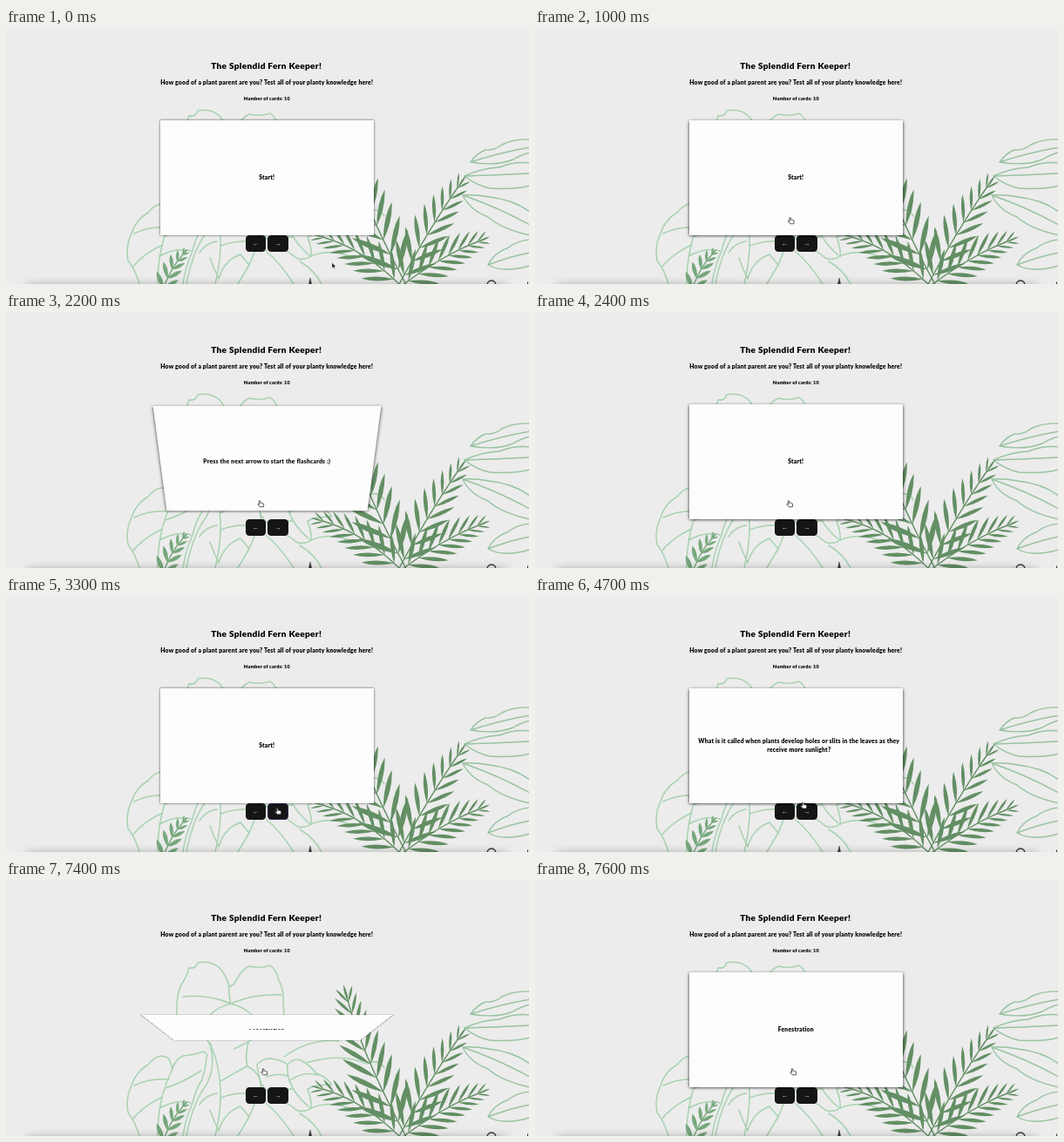
An HTML page for the animation above (8000 ms loop, 600 by 294 pixels).

```html
<!DOCTYPE html>
<html lang="en">
<head>
<meta charset="utf-8">
<title>Plant flashcards</title>
<style>
  html, body { margin: 0; width: 100%; height: 100%; overflow: hidden; background: #ececec; }
  #stage { position: relative; width: 600px; height: 294px; overflow: hidden; font: 900 6.8px Lato, sans-serif; color: #000; }
  text, #label { letter-spacing: .029em; }
  svg { position: absolute; left: 0; top: 0; overflow: visible; }
  .fade { position: absolute; left: 26px; top: 298px; width: 548px; height: 10px; box-shadow: 0 0 12px 1px rgba(0,0,0,.45); }
  #card {
    position: absolute; left: 177px; top: 106px; width: 244.5px; height: 131.5px;
    box-sizing: border-box; background: #fdfdfd; outline: 1px solid transparent;
    display: flex; align-items: center; justify-content: center;
    text-align: center; line-height: 9.8px; white-space: pre;
    box-shadow: 0 0 2.5px rgba(0,0,0,.7);
  }
  #card.hover { box-shadow: 0 .5px 3.5px rgba(0,0,0,.9); }
  #label { display: inline-block; }
  .btn {
    position: absolute; top: 238px; width: 23.5px; height: 19px; box-sizing: border-box;
    border: 1px solid #151515; border-radius: 4px; background: #151515; color: #e6e6e6;
    font: 400 7.5px/17px "Liberation Sans", sans-serif; text-align: center;
  }
  .btn.hover { border-color: #2b2a5c; }
</style>
</head>
<body>
<div id="stage">
  <svg width="600" height="294" viewBox="0 0 600 294">
    <g fill="none" stroke="#a8d2b0" stroke-width="1.5" stroke-linecap="round" stroke-linejoin="round">
      <!-- top leaf -->
      <path d="M196 155Q195 136 200 122Q207 112 210 101Q218 102 220 95Q236 92 246 102Q253 111 256 122Q260 122 263 117Q270 103 279 99Q292 102 303 98Q311 104 312 113Q319 125 318 139L319 156"/>
      <path d="M256 122Q255 132 258 142Q232 131 203 134M258 142Q242 146 233 156M258 142Q285 130 316 132M258 142Q274 146 284 157M196 155Q220 170 236 190M319 156Q296 178 262 194"/>
      <!-- lower left leaf -->
      <path d="M153 294Q149 279 140 267Q137 251 144 236Q149 220 163 212Q170 203 178 202Q187 203 188 208L191 217Q194 206 203 202Q216 201 226 197Q232 198 230 205Q229 217 225 229Q217 242 214 256Q206 274 203 294"/>
      <path d="M191 217Q174 250 174 294M187 229Q166 227 147 236M180 249Q158 259 146 274M183 239Q204 232 224 219M176 262Q197 251 212 256"/>
      <!-- lower middle leaf -->
      <path d="M233 187Q242 212 230 235Q214 256 207 294M278 186Q274 204 277 214Q293 222 292 238Q286 256 279 272L266 294"/>
      <path d="M236 192Q254 236 240 294M246 231Q262 222 276 214M247 250Q266 242 290 246M234 264Q238 276 244 288Q250 267 269 260L279 272M242 245Q229 247 222 258"/>
      <!-- right middle leaf -->
      <path d="M288 212Q294 205 303 205Q315 206 323 212Q330 204 338 207Q348 212 356 222Q367 226 374 235Q355 235 346 240Q351 253 350 262Q341 268 333 264Q324 256 313 252Q301 247 293 234Q289 223 288 212"/>
      <path d="M323 212Q320 237 348 261M323 225Q311 221 299 226M330 240Q315 239 306 247M326 230Q341 219 358 224M298 256Q315 270 330 294M350 262Q371 253 397 263M337 268Q354 278 362 294M319 203Q349 181 382 185M344 210Q385 198 413 211Q429 205 434 216"/>
    </g>
    <g fill="none" stroke="#98c3a0" stroke-width="1.4" stroke-linecap="round" stroke-linejoin="round">
      <path d="M533 154Q540 144 550 140Q560 141 569 134Q583 127 601 128M533 154Q562 159 582 151Q592 145 601 143M533 154Q566 143 601 137"/>
      <path d="M526 170Q545 161 566 160Q584 153 601 155M526 170Q540 181 555 184Q583 186 601 181M526 170Q563 169 601 167"/>
      <path d="M524 192Q538 191 554 194Q582 197 601 211M524 192Q532 209 553 217Q569 231 601 238M524 192Q562 205 601 226"/>
      <path d="M553 272Q560 258 575 253Q587 244 601 243M553 272Q570 282 601 273M553 272Q579 262 601 258"/>
    </g>
    <g id="fronds"></g>
    <g fill="none" stroke="#333">
      <path d="M349 287L347.5 294H350.5Z" fill="#333" stroke-width=".5"/>
      <circle cx="557" cy="295" r="5" stroke-width="1.3"/>
      <path d="M598.5 294V291.5" stroke-width="1"/>
    </g>
    <g text-anchor="middle">
      <text x="298.7" y="46.8" font-size="10.1">The Splendid Fern Keeper!</text>
      <text x="299.2" y="64.8">How good of a plant parent are you? Test all of your planty knowledge here!</text>
      <text x="299.3" y="83.2" font-size="5.5">Number of cards: 10</text>
    </g>
  </svg>
  <div class="fade"></div>
  <div class="btn" style="left:274.8px">←</div>
  <div class="btn" id="next" style="left:300px">→</div>
  <div id="card"><span id="label"></span></div>
  <svg width="600" height="294" viewBox="0 0 600 294">
    <g id="cursor" stroke-linejoin="round">
      <path id="arrow" d="M0 0V6.2L1.5 4.9L2.5 7L3.5 6.5L2.5 4.5H4.4Z" fill="#111" stroke="#fff" stroke-width=".4"/>
      <path id="hand" d="M-.8 .6Q0 -.5 .7 .6L1.1 2.7Q2 2.1 2.5 3Q3.5 2.5 3.8 3.5Q4.9 3.4 4.7 4.6L4.3 7.3H.2L-2.3 4.4Q-2 3.4 -.9 3.9L-.1 4.5Z" fill="#fff" stroke="#222" stroke-width=".75"/>
    </g>
  </svg>
</div>
<script>
const $ = id => document.getElementById(id);
const card = $('card'), label = $('label'), next = $('next');
const LOOP = 8000, STEP = 100, FLIP = 200;

// Stem along a quadratic curve, with pairs of leaflets that shorten towards the tip.
function frond([x0, y0], [cx, cy], [x1, y1], { pairs, size, fat = .13, spread = .75, fill = '#638f64' }) {
  let d = '';
  const leaf = (x, y, a, len) => {
    const c = Math.cos(a), s = Math.sin(a), w = len * fat;
    const at = (u, v) => (x + u * c - v * s).toFixed(1) + ' ' + (y + u * s + v * c).toFixed(1);
    d += `M${at(0, 0)}Q${at(len * .5, w)} ${at(len, 0)}Q${at(len * .6, -w)} ${at(0, 0)}Z`;
  };
  for (let i = 0; i < pairs; i++) {
    const k = .12 + .86 * i / (pairs - 1), m = 1 - k;
    const x = m * m * x0 + 2 * m * k * cx + k * k * x1;
    const y = m * m * y0 + 2 * m * k * cy + k * k * y1;
    const a = Math.atan2(m * (cy - y0) + k * (y1 - cy), m * (cx - x0) + k * (x1 - cx));
    const len = size * (1 - .6 * k * k), turn = spread * (1 - .35 * k);
    leaf(x, y, a - turn, len);
    leaf(x, y, a + turn, len * .95);
    if (i === pairs - 1) leaf(x, y, a, len);
  }
  $('fronds').insertAdjacentHTML('beforeend',
    `<path d="${d}" fill="${fill}"/>
     <path d="M${x0} ${y0}Q${cx} ${cy} ${x1} ${y1}" fill="none" stroke="${fill}" stroke-width="1.4"/>`);
}
frond([462, 300], [410, 205], [392, 138], { pairs: 10, size: 50 });
frond([448, 300], [484, 232], [519, 182], { pairs: 8, size: 42 });
frond([450, 299], [498, 262], [542, 245], { pairs: 8, size: 38 });
frond([456, 299], [412, 254], [363, 240], { pairs: 8, size: 38 });
frond([178, 306], [188, 276], [203, 260], { pairs: 5, size: 21, fat: .25, fill: '#77a87c' });

function bezier(p, ax, ay, bx, by) {
  if (p <= 0 || p >= 1) return p <= 0 ? 0 : 1;
  const f = (u, a, b) => 3 * u * (1 - u) * (1 - u) * a + 3 * u * u * (1 - u) * b + u * u * u;
  let lo = 0, hi = 1;
  for (let i = 0; i < 24; i++) {
    const mid = (lo + hi) / 2;
    if (f(mid, ax, bx) < p) lo = mid; else hi = mid;
  }
  return f(lo, ay, by);
}
const ease = p => bezier(p, .25, .1, .25, 1);
const glide = p => bezier(p, .35, .1, .4, 1);

const moves = [
  { from: 400, to: 1100, x: 291, y: 216.5 },
  { from: 2700, to: 3300, x: 311, y: 243.5 },
  { from: 4600, to: 5000, x: 295, y: 216.5 }
];
const flips = [
  { at: 1170, from: 0, to: 180 },
  { at: 2175, from: 180, to: 0 },
  { at: 7334, from: 0, to: 180 }
];
const decks = [
  { at: 0, dx: 0, front: 'Start!', back: 'Press the next arrow to start the flashcards :)' },
  { at: 4000, dx: 3.5, back: 'Fenestration',
    front: 'What is it called when plants develop holes or slits in the leaves as they\nreceive more sunlight?' }
];

function pointer(t) {
  let x = 374, y = 269.5;
  for (const m of moves) {
    const p = glide((t - m.from) / (m.to - m.from));
    x += (m.x - x) * p;
    y += (m.y - y) * p;
  }
  return [x, y];
}

function draw(time) {
  const t = Math.floor(time / STEP) * STEP;   // ten pictures a second
  const [x, y] = pointer(t);
  const onCard = x > 177 && x < 421 && y > 106 && y < 237.5;
  const onNext = x > 300 && x < 323.5 && y > 238 && y < 257;

  let angle = 0;
  for (const f of flips) if (t >= f.at) angle = f.from + (f.to - f.from) * ease((t - f.at) / FLIP);
  const deck = decks[t < decks[1].at ? 0 : 1], back = angle > 90;

  const text = back ? deck.back : deck.front;
  if (label.textContent !== text) label.textContent = text;
  label.style.transform = `translateX(${back ? 0 : deck.dx}px)`;
  const tilt = back ? angle - 180 : angle;
  card.style.transform = Math.abs(tilt) < .01 ? 'none' : `perspective(430px) rotateX(${tilt}deg)`;

  card.classList.toggle('hover', onCard && Math.abs(tilt) < 60);
  next.classList.toggle('hover', onNext);
  $('cursor').setAttribute('transform', `translate(${x.toFixed(2)} ${y.toFixed(2)})`);
  $('arrow').style.display = onCard || onNext ? 'none' : '';
  $('hand').style.display = onCard || onNext ? '' : 'none';
}

const start = performance.now();
function tick() {
  draw((performance.now() - start) % LOOP);
  requestAnimationFrame(tick);
}
tick();
</script>
</body>
</html>
```
